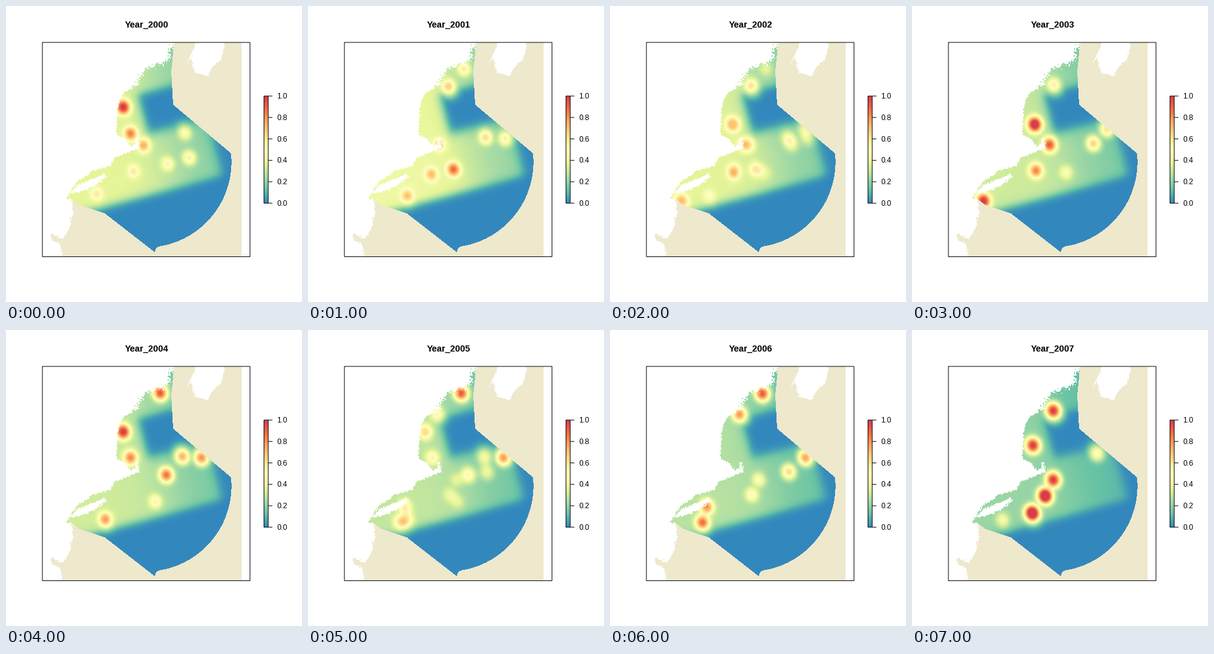
These frames come from a looping animation (480 by 480 pixels, 8 s). A matplotlib script:

```python
import numpy as np
import matplotlib.pyplot as plt
from matplotlib.animation import FuncAnimation
from matplotlib.colors import LinearSegmentedColormap
from matplotlib.path import Path

SIZE = 480
TAN = np.array([238, 232, 205]) / 255
SPECTRAL = LinearSegmentedColormap.from_list("spectral", [
    "#3288BD", "#66C2A5", "#ABDDA4", "#E6F598", "#FFFFBF",
    "#FEE08B", "#FDAE61", "#F46D43", "#D53E4F"])

rng = np.random.default_rng(4)
Y, X = np.mgrid[0:SIZE, 0:SIZE] + 0.5


def along_across(dx, dy, tilt=np.radians(15)):
    """Turn offsets into shelf coordinates: along it, and out to sea."""
    c, s = np.cos(tilt), np.sin(tilt)
    return dx * c - dy * s, dx * s + dy * c


def step(d, width):
    return 1 / (1 + np.exp(np.clip(-d / width, -50, 50)))


# ---- geography -------------------------------------------------------
MAINLAND = [
    (271, 40), (271, 60), (266, 72), (266, 82), (257, 91), (243, 97),
    (225, 102), (218, 116), (207, 130), (190, 142), (182, 156), (180, 190),
    (179, 208), (193, 216), (203, 227), (212, 224), (209, 215), (214, 215),
    (217, 230), (198, 237), (176, 248), (168, 260), (140, 268), (116, 284),
    (97, 312), (107, 313), (108, 340), (103, 362), (93, 378), (74, 369),
    (74, 379), (88, 386), (91, 407), (40, 407), (40, 40)]
LONG_ISLE = [(104, 304), (112, 293), (160, 272), (163, 276), (145, 291),
             (118, 302)]
EAST_LAND = [(310, 50), (351, 50), (355, 66), (348, 88), (334, 100),
             (326, 114), (306, 107), (300, 85)]
INLET = [(293, 93), (299, 80), (308, 63), (309, 64), (301, 80), (294, 93)]


def arc(cx, cy, r, start, stop):
    t = np.radians(np.linspace(start, stop, 40))
    return list(zip(cx + r * np.cos(t), cy + r * np.sin(t)))


DOMAIN = ([(272, 66), (268, 106), (271, 160), (365, 239)]
          + arc(226.8, 252.7, 138.8, -5, 81.5)
          + [(243, 393), (241, 399), (205, 371), (160, 336), (118, 322),
             (106, 313), (97, 314), (90, 250), (165, 200), (165, 140),
             (225, 80), (260, 62)])


def inside(points, x=X, y=Y):
    grid = np.column_stack([x.ravel(), y.ravel()])
    return Path(points + points[:1]).contains_points(grid).reshape(x.shape)


def rough():
    """Blocky noise at two scales."""
    return sum(np.kron(rng.normal(size=(SIZE // n, SIZE // n)),
                       np.ones((n, n))) * k for n, k in [(2, 1), (5, 0.5)])


# A ragged shore comes from looking the outlines up at shaken coordinates.
amp = 0.9 + 1.5 * ((Y < 150) & (X > 200) & (X < 275))
xs, ys = X + amp * rough(), Y + amp * rough()
land = inside(INLET)
for shape in (MAINLAND, LONG_ISLE, EAST_LAND):
    land |= inside(shape, xs, ys)
sea = inside(DOMAIN) & ~land

base = np.ones((SIZE, SIZE, 3))
base[(X > 59) & (X < 382) & (Y > 59) & (Y < 406) & ~land] = TAN

# ---- density: shelf level, then the main peaks as x, y, level ---------
SURVEYS = {
    2000: (.38, [(190, 164, 1), (202, 207, .8), (223, 226, .7),
                 (290, 206, .46), (297, 246, .54), (262, 256, .5),
                 (207, 268, .5), (147, 305, .5)]),
    2001: (.42, [(253, 102, .54), (228, 131, .64), (213, 225, .58),
                 (288, 213, .6), (320, 215, .54), (236, 265, .85),
                 (200, 273, .64), (161, 308, .62)]),
    2003: (.33, [(199, 192, 1.1), (223, 225, .9), (230, 128, .54),
                 (294, 223, .64), (316, 200, .6), (201, 267, .8),
                 (250, 270, .44), (116, 316, 1)]),
    2004: (.33, [(250, 102, .92), (190, 165, 1), (202, 207, .8),
                 (317, 207, .8), (286, 205, .72), (260, 235, .85),
                 (242, 278, .5), (161, 307, .75)]),
    2006: (.28, [(247, 103, .92), (210, 137, .78), (317, 207, .76),
                 (290, 230, .62), (241, 243, .46), (230, 267, .5),
                 (157, 287, .78), (150, 312, .86)]),
    2007: (.22, [(229, 131, 1), (196, 187, 1), (300, 200, .5),
                 (229, 243, 1), (216, 269, 1.2), (195, 297, 1.2),
                 (147, 308, .42)])}

U, V = along_across(X - 240, Y - 175)
basin = step(U + 18, 4) * step(V + 38, 4) * step(30 - V, 5)
shelf = (step(124 - V, 4) * step(80 - U, 5) * (1 - basin)
         * (1 - 0.5 * step(U, 25)))


def field(level, peaks, power=2.5):
    """Soft maximum of the shelf and its peaks."""
    total = (level * shelf) ** power
    for x, y, height in peaks:
        u, v = along_across(X - x, Y - y)
        bump = height * np.exp(-((u / 10) ** 2 + (v / 11) ** 2) / 2)
        total += bump ** power
    return np.clip(total ** (1 / power), 0, 1)


fields = {year: field(*survey) for year, survey in SURVEYS.items()}
for year in (2002, 2005):
    fields[year] = (fields[year - 1] + fields[year + 1]) / 2


def picture(year):
    rgb = base.copy()
    rgb[sea] = SPECTRAL(fields[year][sea])[:, :3]
    return rgb


# ---- stage -----------------------------------------------------------
fig = plt.figure(figsize=(SIZE / 72, SIZE / 72), dpi=72, facecolor="white")
ax = fig.add_axes([0, 0, 1, 1])
ax.axis("off")
image = ax.imshow(picture(2000), extent=(0, SIZE, SIZE, 0),
                  interpolation="nearest", aspect="auto")
ax.imshow(np.linspace(1, 0, 256)[:, None], cmap=SPECTRAL,
          extent=(418.3, 425.2, 319.8, 146), interpolation="nearest",
          aspect="auto")
ax.set(xlim=(0, SIZE), ylim=(SIZE, 0))


def line(xs, ys):
    ax.plot(xs, ys, color="black", lw=1, snap=False,
            solid_joinstyle="miter", solid_capstyle="butt")


def box(x0, y0, x1, y1):
    line([x0, x1, x1, x0, x0], [y0, y0, y1, y1, y0])


box(59.04, 59.04, 395.7, 406.56)
box(418.3, 146, 425.2, 319.8)
for k in range(6):
    y = 319.8 - 34.76 * k
    line([425.2, 432], [y, y])
    ax.text(439, y + 4, f"{k / 5:.1f}", family="Liberation Sans", size=12)
title = ax.text(227.9, 35, "", family="Liberation Sans", weight="bold",
                size=14.4, ha="center", va="baseline")


def update(i):
    year = 2000 + i
    image.set_data(picture(year))
    title.set_text(f"Year_{year}")
    return image, title


anim = FuncAnimation(fig, update, frames=8, interval=1000, repeat=True,
                     repeat_delay=0)
plt.show()
```
